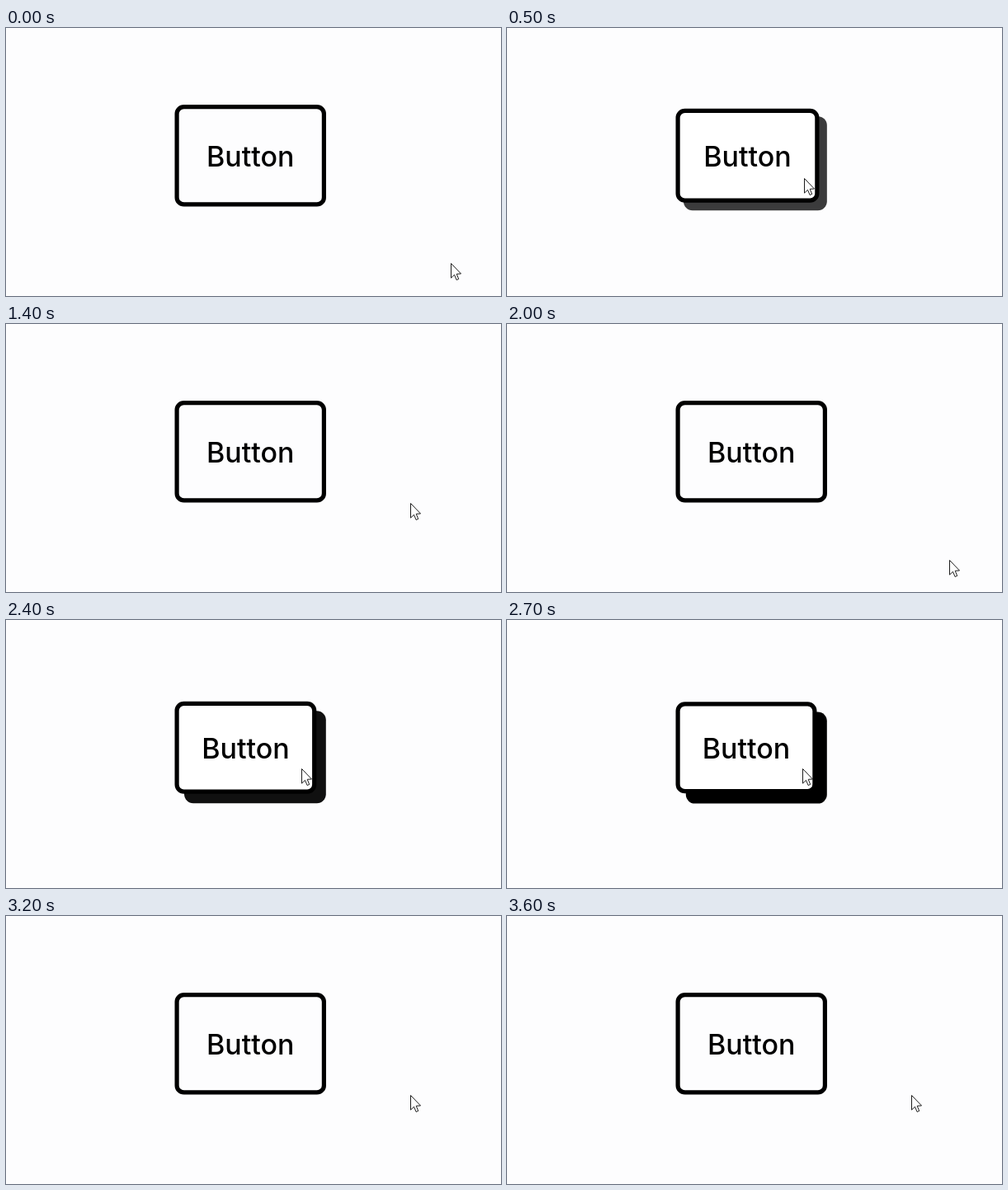
An HTML page with a canvas that plays this animation: 600 by 325 pixels, repeating every 3.7 s.

```html
<!DOCTYPE html>
<html lang="en">
<head>
<meta charset="utf-8">
<title>Button hover</title>
<style>
  html, body { margin: 0; width: 100%; height: 100%; overflow: hidden; background: #fdfdfe; }
  canvas { display: block; }
</style>
</head>
<body>
<canvas id="stage" width="600" height="325"></canvas>
<script>
const ctx = document.getElementById('stage').getContext('2d');
const LOOP = 3700, CYCLE = LOOP / 2, STEP = 100;
const HOVER_IN = 398, HOVER_OUT = 1122, FADE = 220;
const PAPER = '#fdfdfe';

const away = { x: 539, y: 285 }, over = { x: 358, y: 180 }, rest = { x: 490, y: 217 };

const ramp = (t, start, length) => Math.min(1, Math.max(0, (t - start) / length));
const smooth = k => k * k * (3 - 2 * k);
const cubic = (a, b, s) => 3 * a * s * (1 - s) ** 2 + 3 * b * s * s * (1 - s) + s ** 3;

// CSS "ease": cubic-bezier(.25, .1, .25, 1)
function ease(x) {
  let lo = 0, hi = 1;
  for (let i = 0; i < 24; i++) {
    const mid = (lo + hi) / 2;
    if (cubic(0.25, 0.25, mid) < x) lo = mid; else hi = mid;
  }
  return cubic(0.1, 1, lo);
}

// Point on a curve from a to b, bent towards c
function arc(a, c, b, s) {
  const mix = key => a[key] * (1 - s) ** 2 + 2 * c[key] * s * (1 - s) + b[key] * s * s;
  return { x: mix('x'), y: mix('y') };
}

function pointerAt(t) {
  return t < 1000
    ? arc(away, { x: 500, y: 300 }, over, smooth(ramp(t, 100, 420)))
    : arc(over, { x: 426, y: 182 }, rest, smooth(ramp(t, 1036, 190)));
}

function hoverAt(t) {
  return ease(ramp(t, HOVER_IN, FADE)) - ease(ramp(t, HOVER_OUT, FADE));
}

function box(x, y, w, h, r) {
  ctx.beginPath();
  ctx.roundRect(x, y, w, h, r);
}

function drawButton(p) {
  const x = 204.5, y = 93 + 6.2 * p;
  const w = 183.5 - 12.5 * p, h = 123.5 - 12.4 * p;
  const shift = 12.3 * p, line = 5.2;

  ctx.fillStyle = `rgba(0,0,0,${p.toFixed(3)})`;
  box(x + shift, y + shift, w, h, 11);
  ctx.fill();

  box(x + line / 2, y + line / 2, w - line, h - line, 8.5);
  ctx.fillStyle = p > 0.001 ? '#fff' : PAPER;
  ctx.fill();
  ctx.lineWidth = line;
  ctx.strokeStyle = '#000';
  ctx.stroke();

  ctx.fillStyle = '#000';
  ctx.font = '500 34px Inter, "Open Sans", sans-serif';
  ctx.textAlign = 'center';
  ctx.fillText('Button', x + w / 2, 167.5);
}

const arrow = new Path2D('M0 0V17.6L4 13.8L6.6 20L9.2 18.9L6.7 12.8L12 12.5Z');

function drawPointer({ x, y }) {
  ctx.save();
  ctx.translate(Math.round(x) + 0.5, Math.round(y) + 0.5);
  ctx.fillStyle = '#fff';
  ctx.fill(arrow);
  ctx.lineWidth = 1;
  ctx.strokeStyle = '#1c1c1c';
  ctx.stroke(arrow);
  ctx.restore();
}

function draw(now) {
  const t = Math.floor((now % LOOP) / STEP) * STEP % CYCLE;
  ctx.fillStyle = PAPER;
  ctx.fillRect(0, 0, 600, 325);
  drawButton(hoverAt(t));
  drawPointer(pointerAt(t));
}

const start = performance.now();
function tick() {
  draw(performance.now() - start);
  requestAnimationFrame(tick);
}
tick();
</script>
</body>
</html>
```
